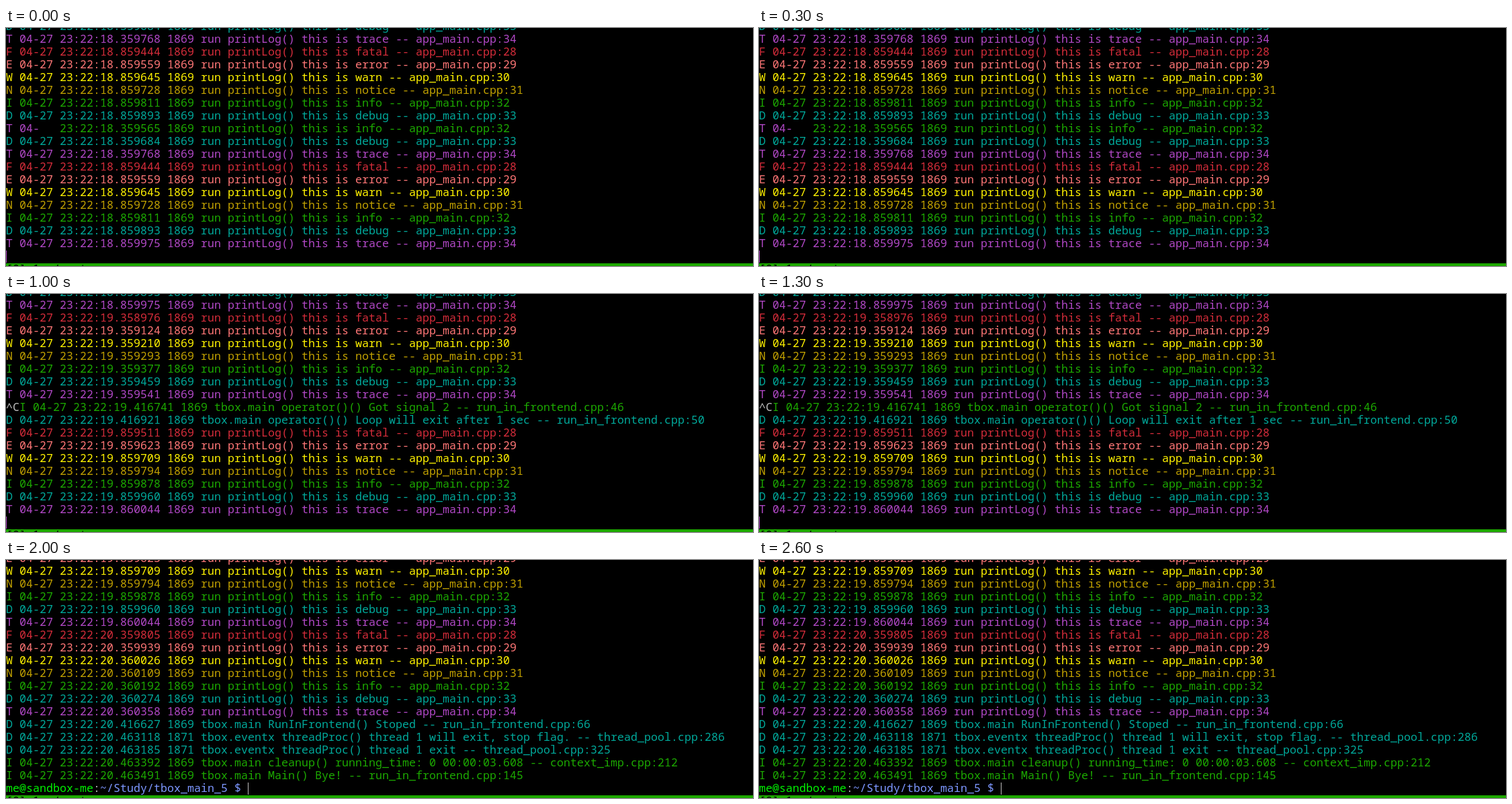
These frames come from a looping animation (1112 px wide and 354 px high, 3000 ms). An HTML page with a canvas:

```html
<!DOCTYPE html>
<html lang="en">
<head>
<meta charset="utf-8">
<title>Terminal log</title>
<style>
html, body { margin: 0; width: 100%; height: 100%; overflow: hidden; background: #000; }
canvas { display: block; }
</style>
</head>
<body>
<canvas id="term" width="1112" height="354"></canvas>
<script>
const ctx = document.getElementById('term').getContext('2d');
const CELL = 10, LINE = 19, TOP = -11, ROWS = 18, BASE = 14;
const LOOP = 3000, STEP = 500;

const GREY = '#bfbfbf', LIME = '#00f200', BLUE = '#7d97ff', BAR = '#1ca800';
const COLORS = {
  F: '#d42c3a', E: '#ff7676', W: '#fff200', N: '#c0a000',
  I: '#1ca800', D: '#00a89a', T: '#b148c6'
};
const LEVELS = ['fatal', 'error', 'warn', 'notice', 'info', 'debug', 'trace'];

// A row is a list of [text, color] spans.
const row = (level, time, text, thread = 1869) =>
  [[`${level} 04-27 23:22:${time} ${thread} ${text}`, COLORS[level]]];

const logRow = (i, time) =>
  row(LEVELS[i][0].toUpperCase(), time, `run printLog() this is ${LEVELS[i]} -- app_main.cpp:${28 + i}`);

const batch = (sec, micros) =>
  micros.map((us, k) => logRow(k + LEVELS.length - micros.length, `${sec}.${us}`));

const tail = batch(18, [359684, 359768]);
const second = batch(18, [859444, 859559, 859645, 859728, 859811, 859893, 859975]);

const log = [
  ...tail,
  ...second,
  ...batch(19, [358976, 359124, 359210, 359293, 359377, 359459, 359541]),
  [['^C', GREY], ...row('I', '19.416741', 'tbox.main operator()() Got signal 2 -- run_in_frontend.cpp:46')],
  row('D', '19.416921', 'tbox.main operator()() Loop will exit after 1 sec -- run_in_frontend.cpp:50'),
  ...batch(19, [859511, 859623, 859709, 859794, 859878, 859960, 860044]),
  ...batch(20, [359805, 359939, 360026, 360109, 360192, 360274, 360358]),
  row('D', '20.416627', 'tbox.main RunInFrontend() Stoped -- run_in_frontend.cpp:66'),
  row('D', '20.463118', 'tbox.eventx threadProc() thread 1 will exit, stop flag. -- thread_pool.cpp:286', 1871),
  row('D', '20.463185', 'tbox.eventx threadProc() thread 1 exit -- thread_pool.cpp:325', 1871),
  row('I', '20.463392', 'tbox.main cleanup() running_time: 0 00:00:03.608 -- context_imp.cpp:212'),
  row('I', '20.463491', 'tbox.main Main() Bye! -- run_in_frontend.cpp:145')
];

// Half-redrawn screen: a torn row, then the last rows repeated.
const infoText = logRow(4, '18.359565')[0][0];
const torn = [['T 04-', COLORS.T], ['   ' + infoText.slice(8), COLORS.I]];
const opening = [...tail, ...second.slice(0, 6), torn, ...tail, ...second];

const prompt = [['me@sandbox-me', LIME], [':', GREY], ['~/Study/tbox_main_5 $ ', BLUE]];

const scrolled = first => log.slice(first, first + ROWS);
const screens = [opening, scrolled(0), scrolled(7), scrolled(15), scrolled(log.length - ROWS)];

function drawRow(spans, y) {
  let x = 0;
  for (const [text, color] of spans) {
    ctx.fillStyle = color;
    for (const ch of text) {
      if (ch !== ' ') ctx.fillText(ch, x, y + BASE);
      x += CELL;
    }
  }
  return x;
}

function draw(time) {
  const index = Math.min(Math.floor(time % LOOP / STEP), screens.length - 1);
  const done = index === screens.length - 1;
  const bottom = TOP + ROWS * LINE;

  ctx.fillStyle = '#000';
  ctx.fillRect(0, 0, 1112, 354);
  ctx.font = '16.667px "Noto Sans Mono", "DejaVu Sans Mono", monospace';
  screens[index].forEach((spans, i) => drawRow(spans, TOP + i * LINE));

  const x = done ? drawRow(prompt, bottom) : 0;
  ctx.fillStyle = done ? GREY : COLORS.T;
  ctx.fillRect(x, bottom, 1, LINE - 1);

  ctx.fillStyle = BAR;
  ctx.fillRect(0, bottom + LINE, 1112, 4);
  drawRow([['[0] 1:./root', '#000']], bottom + LINE);
}

const start = performance.now();
function tick() {
  draw(performance.now() - start);
  requestAnimationFrame(tick);
}
tick();
</script>
</body>
</html>
```
